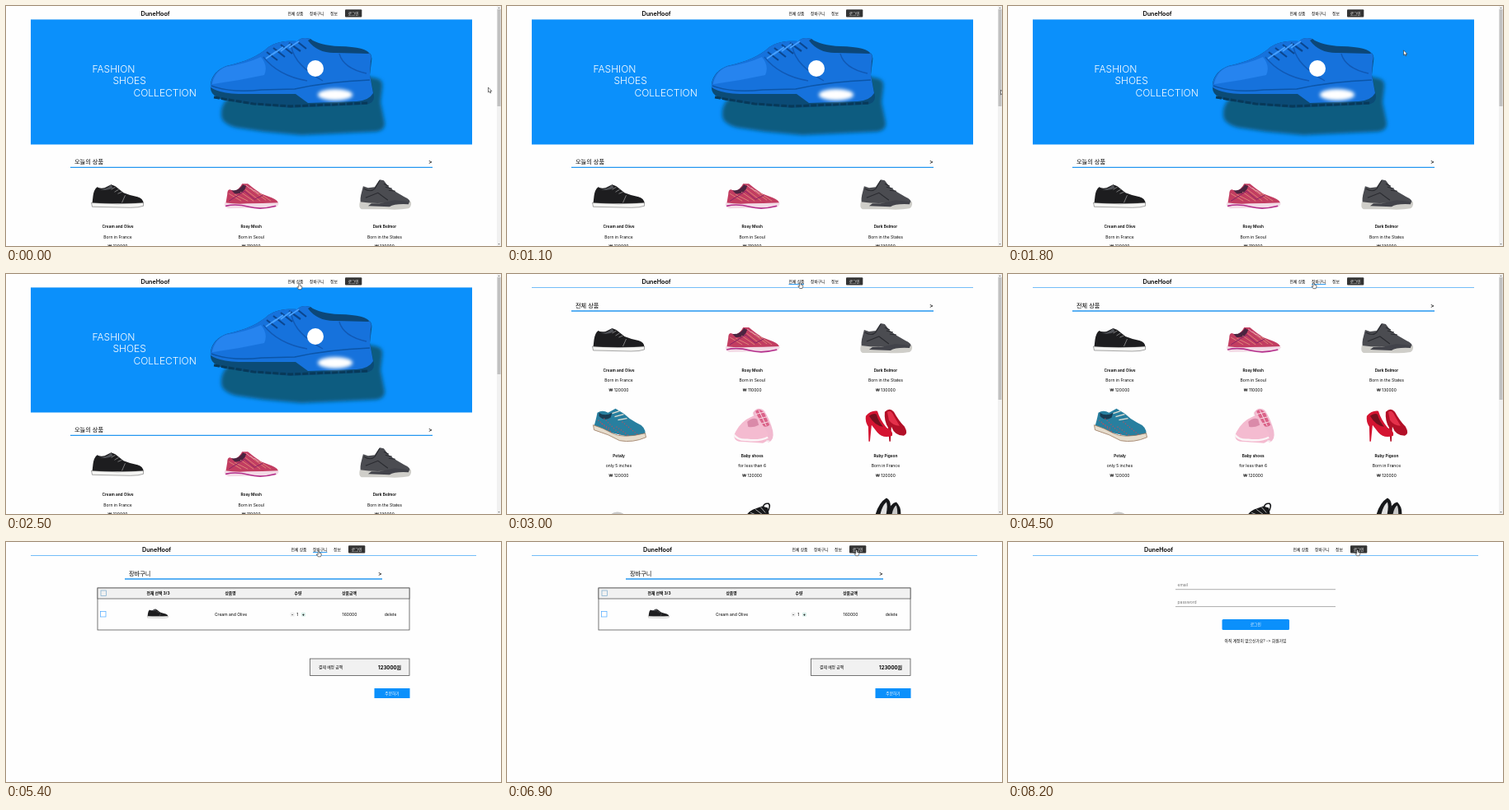
An HTML page for the animation above (8300 ms loop, 600 by 292 pixels).

```html
<!DOCTYPE html>
<html lang="ko">
<head>
<meta charset="utf-8">
<style>
html, body { margin: 0; width: 100%; height: 100%; overflow: hidden; background: #fefefe; }
svg { display: block; width: 600px; height: 292px; }
text { font-family: Inter, "Noto Sans CJK KR", "Noto Sans CJK", sans-serif; white-space: pre; }
</style>
</head>
<body>
<svg id="stage" viewBox="0 0 600 292"></svg>
<script>
const LOOP = 8300, BLUE = '#0b90fb';

const text = (x, y, str, size = 4.8, weight = 400, fill = '#000', anchor = 'start') =>
  `<text x="${x}" y="${y}" font-size="${size}" font-weight="${weight}" fill="${fill}" text-anchor="${anchor}">${str}</text>`;
const mid = (x, y, str, size = 5, weight, fill) => text(x, y, str, size, weight, fill, 'middle');
const rect = (x, y, w, h, fill, more = '') => `<rect x="${x}" y="${y}" width="${w}" height="${h}" fill="${fill}" ${more}/>`;
const path = (d, fill, more = '') => `<path d="${d}" fill="${fill}" ${more}/>`;
const line = (d, stroke, width = 1, more = '') => path(d, 'none', `stroke="${stroke}" stroke-width="${width}" ${more}`);
const group = (x, y, body, more = '') => `<g transform="translate(${x} ${y}) ${more}">${body}</g>`;

// Small product pictures, each drawn around its own centre
const shoes = [
  // low black sneaker
  path('M-31 9L-30 0Q-29-8-25-11Q-22-9-16-10L-8-14L-3-12L7-4Q14-1 24 1Q31 3 31 9Z', '#1d1d1f') +
    path('M-32 8Q0 11 31 8L31 12Q26 14 15 14L-31 13Z', '#f4f4f2', 'stroke="#555" stroke-width=".5"') +
    path('M-24-9Q-17-7-11-11L-8-14L-6-10Q-14-5-24-9Z', '#53555a') +
    line('M-8-8l5-3M-4-5l5-3M0-3l5-2M9-1L5 8', '#a5a5a5', .7),
  // red runner
  path('M-31 10Q-30 4-29-2Q-29-8-26-8L-20-6Q-14-9-11-15L-4-15Q3-9 12-3L25 2Q33 5 33 10Z', '#c23d61') +
    path('M-32 8Q-18 10-5 9Q14 9 33 8Q34 12 28 14L-28 15Q-34 13-32 8Z', '#f3dbe6') +
    line('M-31 12Q-18 9-3 13T30 12', '#b4308c', 1.7) +
    path('M-24-7Q-15-6-10-14L-6-12Q-9-2-20-3Z', '#4b2440') +
    line('M-27-3L-12 6M-20-2L-4 6M-13-5L3 6M-7-8L11 6M-1-9L18 5M9-4L24 6', '#e5967f', .8) +
    line('M-27 6L-8-6L4 4L14-1', '#882464', 1) + line('M-6-13l5 4M-1-10l5 4M4-7l5 4', '#f5c2cf', .8),
  // grey high top
  path('M-29 10Q-30 2-28-4L-26-12L-20-10L-12-11L-6-20L-1-19L5-11Q13-5 24 1Q32 4 31 10Z', '#4b4c51') +
    path('M-30 7Q-11 10 4 8Q20 10 32 7Q33 13 29 15Q18 17 2 16L-28 16Q-32 14-30 7Z', '#cfcec9') +
    path('M-6 9L12 5L30 7L29 10Q12 9 6 13L-20 12L-16 9Z', '#42434a') +
    line('M-25-9Q-17-4-12-9L-6-19M-23 2L-8-4L4 5M-1-15l6 3M1-11l8 2M5-7l8 1', '#292a2f', 1.1),
  // patterned lace-up
  path('M-30 1Q-28-5-26-15Q-20-19-13-15L-4-20L6-14Q13-7 21-3Q33 2 32 11Q25 17 11 14L-15 8Z', '#287f9f') +
    path('M-31 0Q-18 4-8 10Q4 17 32 10L33 15Q17 22 1 19L-13 12L-30 6Z', '#e6dccc', 'stroke="#98765d" stroke-width=".8"') +
    path('M-24-15Q-17-10-8-15L-10-9Q-18-4-24-11Z', '#183d54') +
    line('M-25-6L-8 10M-18-8L3 13M-21-2L-10 5M4-4L23 12M-3 2L12 13', '#b54f60', 1.2, 'stroke-dasharray="1.2 2.1"') +
    line('M-8-14l9-3M-5-10l11-3M-1-6l11-2', '#e5e1d5', 1.3),
  // pink slip-ons
  path('M1-15Q6-23 14-18Q21-8 25 7Q27 18 20 21Q12 19 8 8Q1-2 1-15Z', '#f1b9cf') +
    path('M4-17Q10-21 15-14L21 0Q16 4 11 0Z', '#db6389') +
    line('M4-13L16-16M6-7L18-10M9-1L20-4M8-18L17 1', '#f8dbe5', 1) +
    line('M1-13Q1 1 9 11Q14 20 21 20', '#f7eef2', 1.7) +
    path('M-20 8Q-13-5-1-10Q6-13 8-8L19 10Q21 19 13 22L-16 20Q-25 17-20 8Z', '#f4bbd0') +
    path('M-6-4Q1-10 6-7L8 0Q0 4-5 2Z', '#da8aa9') +
    line('M-22 12Q-17 19-6 18Q9 20 19 15', '#fbf5f7', 2.4),
  // red pumps
  path('M-1-16Q5-22 10-16Q16-5 23 2Q28 11 22 13Q11 13 7 2L6 20H4.5L3 3Q-2-5-1-16Z', '#b20f27') +
    path('M2-16Q7-19 10-11L17 1Q9 1 4-6Z', '#e4304a') +
    path('M-24-11Q-18-18-10-17Q-7-7 1 3Q10 8 8 13Q-3 17-10 9L-17 0L-19 20H-20.5L-21 2Q-25-4-24-11Z', '#d41431') +
    path('M-20-11Q-15-15-11-13Q-9-5-3 2Q-13 1-20-11Z', '#75101e'),
  path('M-11 8Q-9 2-2 2Q6 2 8 8Z', '#c9c9c9'),
  path('M-8 8Q-4 0 4-2L12-5L19-3L21 8Z', '#17181a') +
    line('M13-3Q14-9 20-8Q23-5 18 3', '#17181a', 1.6) + line('M-2 3L8 7M4-1L12 5M10-4L16 3', '#d7d7d7', .8),
  path('M1 8Q5-9 13-10Q20-3 18 8Z', '#17181a') + path('M7 8Q9-4 13-6Q15 0 14 8Z', '#c9c9c9') +
    path('M-13 8Q-9-9 1-15Q6-13 6-5L3 8Z', '#17181a') + path('M-7 8Q-5-5 1-10Q3-4 0 8Z', '#e2e2e2')
];

const items = [
  ['Cream and Olive', 'Born in France', 120000],
  ['Rosy Mesh', 'Born in Seoul', 110000],
  ['Dark Belmor', 'Born in the States', 130000],
  ['Petaly', 'only 5 inches', 120000],
  ['Baby shoes', 'for less than 6', 120000],
  ['Ruby Pigeon', 'Born in France', 120000]
];

const heading = (x1, x2, title) =>
  text(x1 + 5, 41, title, 7.2) + text(x2 - 5, 41.2, '&gt;', 7, 500) + line(`M${x1} 45H${x2}`, '#2497f0', 1.3);

const products = (title, y) => group(0, y, heading(78, 517, title) +
  shoes.map((shoe, i) => {
    const [name, note, price] = items[i] || [];
    const labels = name ? mid(0, 39, name, 4.8, 600) + mid(0, 51.3, note) + mid(0, 63, '₩ ' + price) : '';
    return group(135.5 + i % 3 * 161.7, 80 + Math.floor(i / 3) * 103.7, shoe + labels);
  }).join(''));

const scrollbar = height => rect(595, 0, 5, 292, '#f1f1f1') + rect(595.5, 4, 4, height, '#c1c1c1') +
  path('M596.3 3L597.5 1.5L598.7 3Z M596.3 289L597.5 290.5L598.7 289Z', '#777');

const body = 'M248 100C247 88 254 78 267 73C290 68 306 61 318 50C328 43 342 42 353 43Q358 37 369 40Q375 48 388 49Q416 50 436 55Q445 57 443 67L441 84L446 109Q447 119 435 120L345 124L300 120L266 115Q248 110 248 100Z';
const hero = rect(30, 16.5, 535, 152, BLUE) +
  text(104.5, 80.5, 'FASHION', 12, 300, '#fff') + text(129.5, 95, 'SHOES', 12, 300, '#fff') +
  text(154.5, 109.5, 'COLLECTION', 12, 300, '#fff') +
  group(13, 33, path(body, '#0c5c80', 'filter="url(#soft)"')) +
  path(body, '#0b4b76') +
  path('M248 99C248 88 254 78 267 73C290 68 306 61 318 50C328 43 342 42 353 43Q358 37 369 40Q375 48 388 49Q416 50 436 55Q445 57 442 67L441 84L445 106Q440 115 425 116L366 118L351 107L282 107Q258 106 248 99Z', '#1672dc') +
  path('M366 42Q378 58 400 57L440 58Q438 50 404 49Q380 48 369 40Z', '#0c4778') +
  path('M267 74Q292 70 309 62Q318 73 313 84Q281 91 250 95Q253 79 267 74Z', '#2684ef') +
  line('M249 97Q272 106 310 102L350 101Q390 92 441 90', '#0b55a8', 1.6) +
  line('M312 62Q330 85 365 91M346 50Q350 72 384 91M404 58Q409 76 437 82', '#1059b5', 1.4) +
  line('M316 56l13 10M324 51l14 11M333 47l14 11M343 45l14 10M354 44l10 8', '#0b468f', 2.2) +
  line('M315 64l13-9M323 59l13-9M333 55l12-9M343 51l12-8', '#46a0ff', 1.7) +
  line('M252 111L300 119L345 122L440 118', '#073959', 3, 'stroke-dasharray="7 2"') +
  `<circle cx="375" cy="76" r="10" fill="#fff"/>` +
  `<ellipse cx="399" cy="108" rx="21" ry="7" fill="#fff" filter="url(#soft)"/>`;

const button = (x, y, w, h, label, more) => rect(x, y, w, h, BLUE, more) + mid(x + w / 2, y + h / 2 + 1.7, label, 4.7, 400, '#fff');
const frame = 'stroke="#555" stroke-width=".8"';

const cart = heading(144, 456, '장바구니') +
  rect(111, 56, 378, 51, '#fefefe', frame) + rect(111, 56, 378, 13, '#f1f1f1', frame) +
  rect(115, 59, 6.5, 6.5, '#f1f1f1', 'stroke="#78a9cc" stroke-width=".7"') +
  rect(114.5, 84.5, 6.5, 6.5, '#fff', 'stroke="#4aa8ff" stroke-width=".7"') +
  [[184.5, '전체 선택 3/3'], [272, '상품명'], [354, '수량'], [416, '상품금액']].map(([x, s]) => mid(x, 64.2, s, 4.8, 700)).join('') +
  group(184, 87, shoes[0], 'scale(.4)') +
  [[272.5, items[0][0]], [353.3, '1'], [416.5, '160000'], [466, 'delete']].map(([x, s]) => mid(x, 89.8, s)).join('') +
  rect(344.7, 85.8, 5, 5, '#eee', 'rx="1"') + rect(358, 85.8, 5, 5, '#d9eee9', 'rx="1"') +
  mid(347.2, 89.8, '-', 4.8, 700) + mid(360.5, 89.8, '+', 4.8, 700) +
  rect(368.5, 142, 120.5, 20.5, '#f1f1f1', frame) + text(379, 154.2, '결제 예정 금액') +
  text(479, 154.7, '123000원', 6, 700, '#000', 'end') +
  button(446.5, 178, 43, 12, '주문하기');

const login =
  text(205.5, 54, 'email', 5, 400, '#777') + line('M203 57.7H397', '#999', .8) +
  text(205.5, 75, 'password', 5, 400, '#777') + line('M203 78.6H397', '#999', .8) +
  button(259.5, 94, 81.5, 13, '로그인', 'rx="1.5"') +
  mid(300, 121.7, '아직 계정이 없으신가요? -&gt; 회원가입', 4.8);

const links = [[341.5, 18.5, '전체 상품'], [368, 17.3, '장바구니'], [393, 9, '정보']];
const header = (wide, cx, cy) => {
  const dx = wide ? 4 : 0;
  return line(`M30 16.5H${wide ? 570 : 565}`, '#74bdf8') +
    text(wide ? 165 : 163.5, 11.5, 'DuneHoof', 7.2, 600) +
    links.map(([x, w, label]) => {
      const over = cy < 11 && cx >= x + dx && cx <= x + dx + w;
      return text(x + dx, 10.8, label) + (over ? line(`M${x + dx} 12.6h${w}`, '#2497f0') : '');
    }).join('') +
    rect(411 + dx, 4.2, 20.3, 9.3, '#333', 'rx="1"') + mid(421.2 + dx, 10.7, '로그인', 4.6, 400, '#fff');
};

// start time, wide layout, content
const pages = [
  [0, false, hero + products('오늘의 상품', 151.3) + scrollbar(118)],
  [2800, false, products('전체 상품', 0) + scrollbar(149)],
  [4900, true, cart],
  [7000, true, login]
];

// time, x, y of the pointer tip
const moves = [[0, 584.5, 99], [1000, 598.5, 102], [1300, 598.5, 102], [1900, 470, 50], [2500, 355.5, 11.5],
  [2600, 355.5, 10.3], [4200, 355.5, 10.3], [4700, 379, 10.6], [6300, 379, 10.6], [6800, 423.5, 9.5], [LOOP, 423.5, 9.5]];

function pointerAt(t) {
  const i = moves.findIndex(m => m[0] > t);
  const [t0, x0, y0] = moves[i - 1], [t1, x1, y1] = moves[i];
  const p = (t - t0) / (t1 - t0), e = p * p * (3 - 2 * p);
  return [x0 + (x1 - x0) * e, y0 + (y1 - y0) * e];
}

const arrow = 'M0 0V6L1.4 4.8L2.4 7L3.4 6.5L2.5 4.5H4.3Z';
const hand = 'M-.8.8Q0-.5.8.8V2.7L3.2 3.4V5.2L2.4 7.2H-.8L-2.7 4.4Q-2.2 3.7-.8 4.8Z';
const stage = document.getElementById('stage');
const defs = '<defs><filter id="soft" x="-20%" y="-30%" width="140%" height="160%"><feGaussianBlur stdDeviation="2"/></filter></defs>';
stage.innerHTML = defs + pages.map(p => `<g class="page">${p[2]}</g>`).join('') + '<g id="top"></g>';
const layers = stage.querySelectorAll('.page'), topLayer = document.getElementById('top');

let last = -1;
function draw() {
  const t = Math.floor(performance.now() % LOOP / 100) * 100;
  if (t !== last) {
    last = t;
    const current = pages.filter(p => p[0] <= t).length - 1;
    const [x, y] = pointerAt(t);
    layers.forEach((layer, i) => layer.setAttribute('display', i === current ? 'inline' : 'none'));
    topLayer.innerHTML = header(pages[current][1], x, y) +
      group(x, y, path(t < 2500 ? arrow : hand, '#fff', 'stroke="#222" stroke-width=".6" stroke-linejoin="round"'));
  }
  requestAnimationFrame(draw);
}
draw();
</script>
</body>
</html>
```
